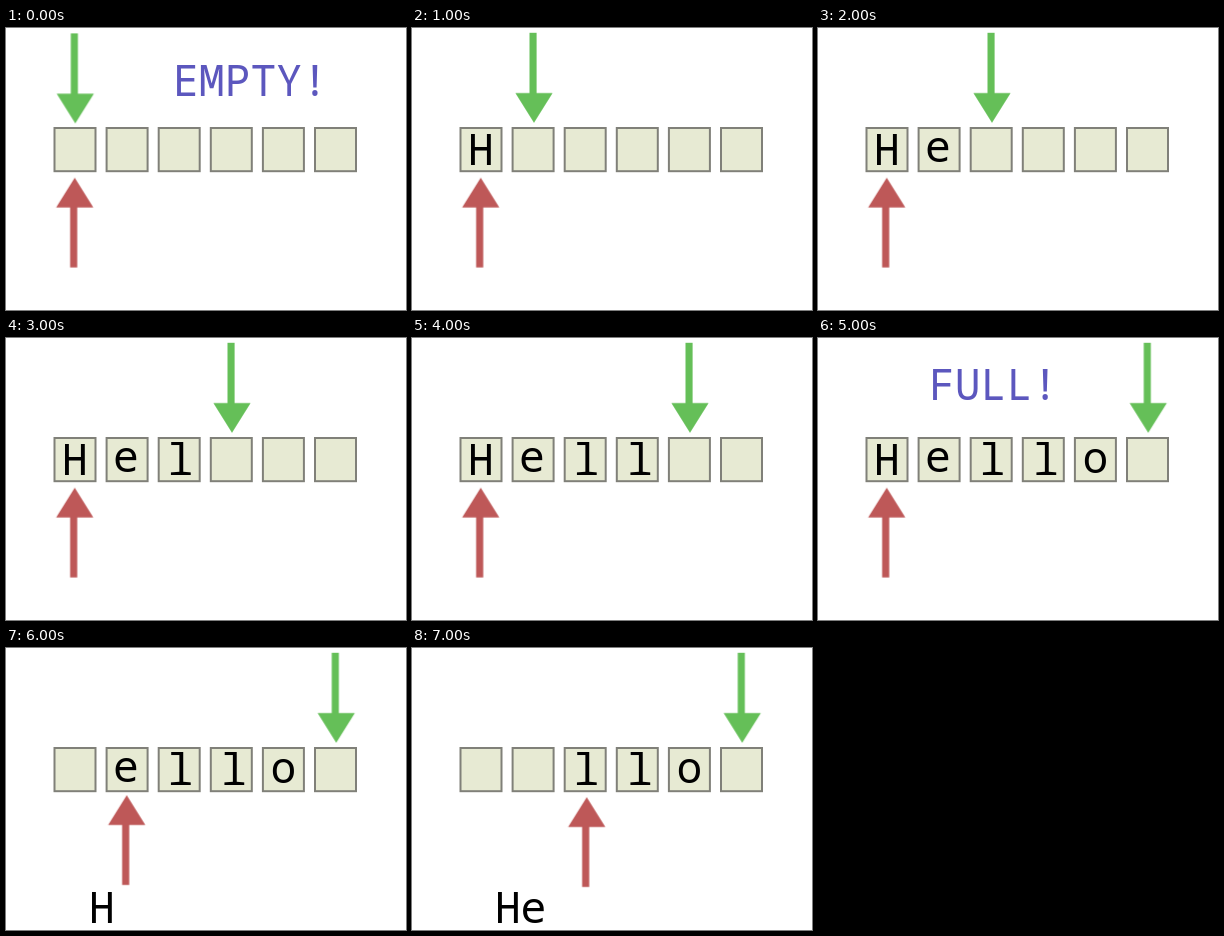
These frames come from a looping animation (400x282 px, 8 s). An HTML page:

```html
<!DOCTYPE html>
<html lang="en">
<head>
<meta charset="utf-8">
<title>Queue buffer</title>
<style>
  html, body { margin: 0; width: 100%; height: 100%; overflow: hidden; background: #fff; }
  svg { display: block; width: 100vw; height: 100vh; }
  text { font: 43px "Noto Sans Mono", "DejaVu Sans Mono", monospace; white-space: pre; }
  .cell { fill: #e7ead3; stroke: #808079; stroke-width: 2; }
  .note { fill: #5c57be; }
  .write { fill: #65bf58; animation: write 8s step-end infinite; }
  .read { fill: #be5858; animation: read 8s step-end infinite; }

  /* Each label is visible for part of the eight one-second steps. */
  .show { opacity: 0; animation: 8s step-end infinite; }
  .empty { animation-name: empty; }
  .full { animation-name: full; }
  .in1 { animation-name: in1; }
  .in2 { animation-name: in2; }
  .in3 { animation-name: in3; }
  .in4 { animation-name: in4; }
  .in5 { animation-name: in5; }
  .out1 { animation-name: out1; }
  .out2 { animation-name: out2; }

  @keyframes empty { 0% { opacity: 1 } 12.5%, 100% { opacity: 0 } }
  @keyframes full { 0% { opacity: 0 } 62.5% { opacity: 1 } 75%, 100% { opacity: 0 } }
  @keyframes in1 { 0% { opacity: 0 } 12.5% { opacity: 1 } 75%, 100% { opacity: 0 } }
  @keyframes in2 { 0% { opacity: 0 } 25% { opacity: 1 } 87.5%, 100% { opacity: 0 } }
  @keyframes in3 { 0% { opacity: 0 } 37.5%, 100% { opacity: 1 } }
  @keyframes in4 { 0% { opacity: 0 } 50%, 100% { opacity: 1 } }
  @keyframes in5 { 0% { opacity: 0 } 62.5%, 100% { opacity: 1 } }
  @keyframes out1 { 0% { opacity: 0 } 75%, 100% { opacity: 1 } }
  @keyframes out2 { 0% { opacity: 0 } 87.5%, 100% { opacity: 1 } }

  @keyframes write {
    0% { transform: translate(69.3px, 95.4px) }
    12.5% { transform: translate(122px, 94.8px) }
    25% { transform: translate(174px, 94.8px) }
    37.5% { transform: translate(226px, 94.8px) }
    50% { transform: translate(278px, 94.8px) }
    62.5%, 100% { transform: translate(330.2px, 94.8px) }
  }
  @keyframes read {
    0% { transform: translate(68.7px, 149.7px) }
    75% { transform: translate(120.7px, 147.2px) }
    87.5%, 100% { transform: translate(174.7px, 149.2px) }
  }
</style>
</head>
<body>
<svg viewBox="0 0 400 282">
  <g class="cell">
    <rect x="48.5" y="100" width="41" height="43.2"/>
    <rect x="100.6" y="100" width="41" height="43.2"/>
    <rect x="152.7" y="100" width="41" height="43.2"/>
    <rect x="204.8" y="100" width="41" height="43.2"/>
    <rect x="256.9" y="100" width="41" height="43.2"/>
    <rect x="309" y="100" width="41" height="43.2"/>
  </g>

  <path class="write" d="M0 0L-18.6 -29.8H-4.5V-90H2.6V-29.8H18.6Z"/>
  <path class="read" d="M0 0L-18.6 29.8H-4.6V89.8H2.5V29.8H18.6Z"/>

  <text class="note show empty" x="167" y="68">EMPTY!</text>
  <text class="note show full" x="111" y="62">FULL!</text>

  <text class="show in1" x="56" y="137">H</text>
  <text class="show in2" x="107" y="134">e</text>
  <text class="show in3" x="161.5" y="137">l</text>
  <text class="show in4" x="215" y="137">l</text>
  <text class="show in5" x="264.5" y="135">o</text>

  <text class="show out1" x="83" y="275">H</text>
  <text class="show out2" x="108.4" y="275">e</text>
</svg>
</body>
</html>
```
